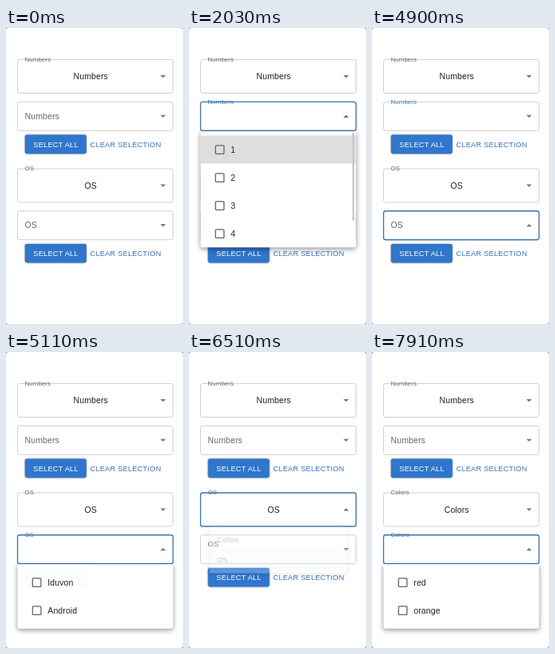
An HTML page for the animation above (8000 ms loop, 222x370 px).

```html
<!DOCTYPE html>
<html lang="en">
<head>
<meta charset="utf-8">
<title>Select form</title>
<style>
  html, body { margin: 0; width: 100%; height: 100%; overflow: hidden; background: #222; }
  svg { display: block; width: 100%; height: 100%; background: #fff; border-radius: 2px; font: 10.5px "Liberation Sans", Arial, sans-serif; }
  text { fill: #212121; letter-spacing: .1px; white-space: pre; }
  .value { text-anchor: middle; }
  .frame { fill: none; stroke: #c4c4c4; stroke-width: .8; }
  .frame.focus { stroke: #3c74b0; stroke-width: 1.35; }
  .arrow { fill: #757575; }
  .button { fill: #2f76cc; filter: drop-shadow(0 .6px .9px rgba(0, 0, 0, .5)); }
  .action { font-size: 9.2px; letter-spacing: .25px; fill: #fff; }
  .action.plain { fill: #3a72b4; }
  .menu { filter: drop-shadow(0 2px 3.5px rgba(0, 0, 0, .32)) drop-shadow(0 1px 2px rgba(0, 0, 0, .14)); }
  .paper { fill: #fff; }
  .box { fill: none; stroke: #5f6368; stroke-width: 1.3; }
  .hover { fill: #dedede; }
  .picked { fill: #ebf3fc; }
</style>
</head>
<body>
<svg id="stage" viewBox="0 0 222 370" preserveAspectRatio="none"></svg>
<script>
const LOOP = 8000, STEP = 70, LAST = 7910;
const LEFT = 14.5, WIDTH = 195, MID = 112, ROW = 35, PLAIN_ROW = 31.2, PAD = 5.2;
const GREY = [102, 102, 102], BLUE = [58, 116, 178];
const stage = document.getElementById('stage');
const $ = id => document.getElementById(id);

// Cubic Bezier easing, solved by bisection
function bezier(x1, y1, x2, y2) {
  const at = (a, b, u) => 3 * a * u * (1 - u) ** 2 + 3 * b * u * u * (1 - u) + u ** 3;
  return x => {
    if (x <= 0) return 0;
    if (x >= 1) return 1;
    let lo = 0, hi = 1;
    for (let i = 0; i < 24; i++) {
      const u = (lo + hi) / 2;
      if (at(x1, x2, u) < x) lo = u; else hi = u;
    }
    return at(y1, y2, lo);
  };
}
const easeInOut = bezier(.4, 0, .2, 1);
const easeOut = bezier(0, 0, .2, 1);

// lag: time already elapsed when the first step shows
const menus = [
  { id: 'numbers', top: 129.3, items: ['1', '2', '3', '4'], open: 1540, close: 4060, lagIn: 0, lagOut: 10, dur: 288, height: 145 },
  { id: 'system', top: 265.3, items: ['Iduvon', 'Android'], open: 4900, close: 5880, lagIn: 0, lagOut: 45, dur: 250 },
  { id: 'kind', top: 218.2, items: ['Colors', 'OS'], open: 6510, close: 7210, lagIn: 60, lagOut: 45, dur: 245, plain: true },
  { id: 'colors', top: 265.3, items: ['red', 'orange'], open: 7700, close: LOOP, lagIn: 40, lagOut: 0, dur: 250 }
];
// focus: [on, off, lag on, lag off]
const fields = [
  { id: 'f1', top: 39.5, height: 42, raised: true, focus: [] },
  { id: 'f2', top: 92.3, height: 36, focus: [[1540, 4900, 0, 0]], menus: [0] },
  { id: 'f3', top: 176, height: 42, raised: true, focus: [[6510, 7700, 60, 40]], menus: [2] },
  { id: 'f4', top: 228.7, height: 36, focus: [[4900, 6510, 0, 60], [7700, LOOP, 40, 0]], menus: [1, 3] }
];

function fieldMarkup(f) {
  const mid = f.top + f.height / 2;
  return `<rect id="${f.id}-frame" class="frame" x="${LEFT}" y="${f.top}" width="${WIDTH}" height="${f.height}" rx="2.6"/>
    ${f.raised ? `<text id="${f.id}-value" class="value" x="106.2" y="${mid + 3.7}"></text>` : ''}
    <path id="${f.id}-arrow" class="arrow" d="M-3.4 -1.6h6.8l-3.4 3.4z"/>
    <text id="${f.id}-label"></text>`;
}

function buttonsMarkup(top) {
  return `<rect class="button" x="23.8" y="${top}" width="77" height="23.6" rx="2.4"/>
    <text class="action" x="34.3" y="${top + 14.9}">SELECT ALL</text>
    <text class="action plain" x="105.5" y="${top + 14.9}">CLEAR SELECTION</text>`;
}

function menuMarkup(m) {
  const row = m.plain ? PLAIN_ROW : ROW;
  m.height ||= 2 * PAD + row * m.items.length;
  const first = m.top + PAD;
  const items = m.items.map((name, i) => {
    const mid = first + row * (i + .5);
    const box = m.plain ? '' : `<rect class="box" x="33.3" y="${mid - 5.2}" width="10.6" height="10.6" rx="1"/>`;
    return `${box}<text x="${m.plain ? 25 : 52.3}" y="${mid + 3.7}">${name}</text>`;
  }).join('');
  const ripple = m.plain
    ? `<clipPath id="row"><rect x="${LEFT}" y="${first}" width="${WIDTH}" height="${row}"/></clipPath>
       <g clip-path="url(#row)"><circle id="ripple" cx="132.5" cy="248.3" r="0" fill-opacity=".24"/></g>` : '';
  const bar = m.items.length > 2 ? '<rect id="bar" x="205" y="131" width="2.2" height="110" rx="1.1"/>' : '';
  return `<g id="${m.id}" class="menu">
    <rect class="paper" x="${LEFT}" y="${m.top}" width="${WIDTH}" height="${m.height}" rx="2.6"/>
    <rect id="${m.id}-mark" class="${m.plain ? 'picked' : 'hover'}" x="${LEFT}" y="${first}" width="${WIDTH}" height="${row}"/>
    ${items}${ripple}${bar}</g>`;
}

stage.innerHTML = fields.map(fieldMarkup).join('') +
  buttonsMarkup(133.6) + buttonsMarkup(269.9) + menus.map(menuMarkup).join('');

function drawField(f, t, name) {
  let lift = 0, focused = false;
  for (const [on, off, lagOn, lagOff] of f.focus) {
    if (t < on) continue;
    focused = t < off;
    lift = focused ? easeOut((t - on + lagOn) / 200) : 1 - easeOut((t - off + lagOff) / 200);
  }
  const open = (f.menus || []).some(i => t >= menus[i].open && t < menus[i].close);
  const mid = f.top + f.height / 2;
  const up = f.raised ? 1 : lift;
  const rest = mid + 3.4, raised = f.top + 2.2;
  const color = GREY.map((from, i) => from + (BLUE[i] - from) * lift);
  const label = $(f.id + '-label');
  label.textContent = name;
  label.style.fill = `rgb(${color})`;
  label.setAttribute('transform', `translate(23.6 ${rest + (raised - rest) * up}) scale(${1 - .25 * up})`);
  if (f.raised) $(f.id + '-value').textContent = name;
  $(f.id + '-frame').classList.toggle('focus', focused);
  $(f.id + '-arrow').setAttribute('transform', `translate(197 ${mid}) rotate(${open ? 180 : 0})`);
}

function drawMenu(m, t) {
  const closing = t >= m.close;
  const age = closing ? t - m.close + m.lagOut : t - m.open + m.lagIn;
  const x = age / m.dur;
  const fade = closing ? 1 - easeInOut(x) : easeInOut(x);
  const grow = closing ? 1 - easeInOut((x - .333) / .666) : easeInOut(x / .666);
  const g = $(m.id);
  g.style.display = t < m.open || fade <= 0 ? 'none' : '';
  g.style.opacity = fade;
  const sx = .75 + .25 * grow, sy = .5625 + .4375 * grow;
  g.setAttribute('transform', `translate(${MID} ${m.top}) scale(${sx} ${sy}) translate(${-MID} ${-m.top})`);
  const mark = $(m.id + '-mark');
  if (m.plain) {
    mark.setAttribute('y', m.top + PAD + (closing ? 0 : PLAIN_ROW));
    $('ripple').setAttribute('r', closing ? 120 * easeInOut(age / 550) : 0);
  } else {
    mark.style.display = !closing && age >= 275 ? '' : 'none';
  }
}

function draw(now) {
  const t = Math.min(LAST, Math.floor(now % LOOP / STEP) * STEP);
  const kind = t < 7210 ? 'OS' : 'Colors';
  fields.forEach((f, i) => drawField(f, t, i < 2 ? 'Numbers' : kind));
  menus.forEach(m => drawMenu(m, t));
  $('bar').style.fill = t < 4060 ? '#c6c6c6' : '#a2a2a2';
}

const start = performance.now();
function tick() {
  draw(performance.now() - start);
  requestAnimationFrame(tick);
}
tick();
</script>
</body>
</html>
```
